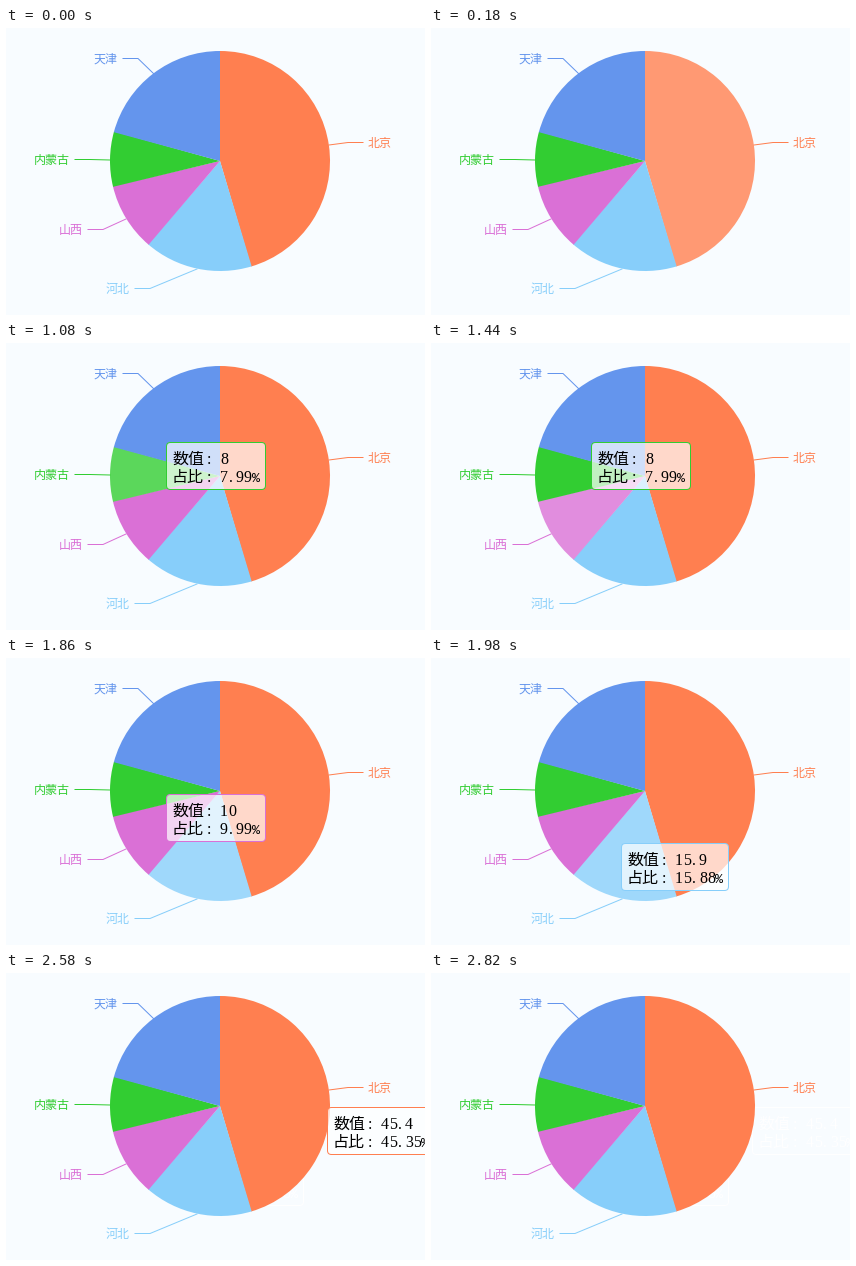
Recreate the animation shown at these times as a matplotlib script. Size 419 px wide and 287 px high, loop 3060 ms.

```python
import matplotlib.pyplot as plt
from matplotlib.animation import FuncAnimation
from matplotlib.colors import to_rgb
from matplotlib.patches import FancyBboxPatch, Wedge

W, H, DPI = 419, 287, 128
PX = 72 / DPI
STEP, LOOP = 60, 3060
CX, CY, R = 214, 133, 110
BG = "#f8fcff"
CJK, DIGITS, MONO = "Noto Sans CJK JP", "Liberation Serif", "Liberation Mono"

# name, value, colour, label (left, middle), leader line, tooltip corner
SLICES = [
    ("北京", 45.4, "#ff7f50", (362, 114.5), [(323, 117), (342, 114.5), (357, 114.5)], (321, 134)),
    ("河北", 15.9, "#87cefa", (100, 260.5), [(191, 241), (144, 260.5), (129, 260.5)], (190, 185)),
    ("山西", 10, "#da70d6", (53, 201.5), [(120, 191), (97, 201.5), (82, 201.5)], (160, 136)),
    ("内蒙古", 8, "#32cd32", (28, 131.5), [(104, 132), (84, 131.5), (69, 131.5)], (160, 99)),
    ("天津", 20.8, "#6495ed", (88, 30.5), [(148, 46), (132, 30.5), (117, 30.5)], (184, 55)),
]
TOTAL = sum(s[1] for s in SLICES)

# time in ms, highlighted slice, slice whose tooltip is shown
TIMELINE = [
    (0, None, None), (180, 0, None), (300, 4, None), (540, 4, 4),
    (1080, 3, 3), (1440, 2, 3), (1560, 2, 2), (1860, 1, 2), (1980, 1, 1),
    (2280, 0, 1), (2400, 0, 0), (2580, None, 0), (2820, None, None),
]
# faint outline left behind by a tooltip: slice -> start time
TRACES = {1: 2400, 0: 2820}

fig = plt.figure(figsize=(W / DPI, H / DPI), dpi=DPI, facecolor=BG)
ax = fig.add_axes([0, 0, 1, 1])
ax.set_xlim(0, W)
ax.set_ylim(H, 0)
ax.axis("off")


def lift(color, k=0.2):
    return tuple(c + (1 - c) * k for c in to_rgb(color))


def text(x, y, s, size, color, font=CJK, z=5, ha="left"):
    return ax.text(x, y, s, fontsize=size * PX, color=color, family=font,
                   ha=ha, va="baseline", zorder=z)


def text_row(x, y, title, number, color, z):
    """16 px title and colon, then figures on an 8 px grid."""
    parts = [text(x, y, title, 16, color, z=z),
             text(x + 35, y, ":", 16, color, DIGITS, z)]
    for i, ch in enumerate(number):
        left = x + 48 + 8 * i
        if ch == "%":
            parts.append(text(left, y, ch, 13.33, color, MONO, z))
        elif ch == ".":
            parts.append(text(left + 1, y, ch, 16, color, DIGITS, z))
        else:
            parts.append(text(left, y, ch, 16, color, DIGITS, z))
    return parts


def tooltip(k, edge, ink, fill, z):
    value, (x, y) = SLICES[k][1], SLICES[k][5]
    share = f"{value / TOTAL:.2%}"
    width = 60 + 8 * len(share)
    box = FancyBboxPatch((x + 0.5, y + 0.5), width - 1, 47,
                         boxstyle="round,pad=0,rounding_size=4", fc=fill,
                         ec=edge, lw=PX, zorder=z)
    ax.add_patch(box)
    return ([box] + text_row(x + 6, y + 22, "数值", f"{value:g}", ink, z + 0.1)
            + text_row(x + 6, y + 40, "占比", share, ink, z + 0.1))


wedges, tips = [], []
start = 0
for k, (name, value, color, (lx, ly), line, _) in enumerate(SLICES):
    end = start + 360 * value / TOTAL
    # a small overlap under the next slice hides the seam
    over = 0.4 if k < len(SLICES) - 1 else 0
    wedge = Wedge((CX, CY), R, start - 90, end - 90 + over, fc=color, lw=0,
                  zorder=2 + k * 0.1)
    wedges.append(ax.add_patch(wedge))
    ax.plot(*zip(*line), color=color, lw=PX, zorder=3)
    text(lx, ly + 4.5, name, 12, color)
    tips.append(tooltip(k, color, "black", (1, 1, 1, 0.7), 8))
    start = end

traces = {k: tooltip(k, "white", "white", "none", 1) for k in TRACES}


def show(parts, on):
    for p in parts:
        p.set_visible(on)


def update(i):
    t = i * STEP
    _, lit, tip = [s for s in TIMELINE if s[0] <= t][-1]
    for k, wedge in enumerate(wedges):
        color = SLICES[k][2]
        wedge.set_facecolor(lift(color) if k == lit else color)
        show(tips[k], k == tip)
    for k, since in TRACES.items():
        show(traces[k], t >= since)
    return wedges


anim = FuncAnimation(fig, update, frames=LOOP // STEP, interval=STEP,
                     init_func=lambda: update(0), repeat=True,
                     repeat_delay=0, blit=False)
plt.show()
```
